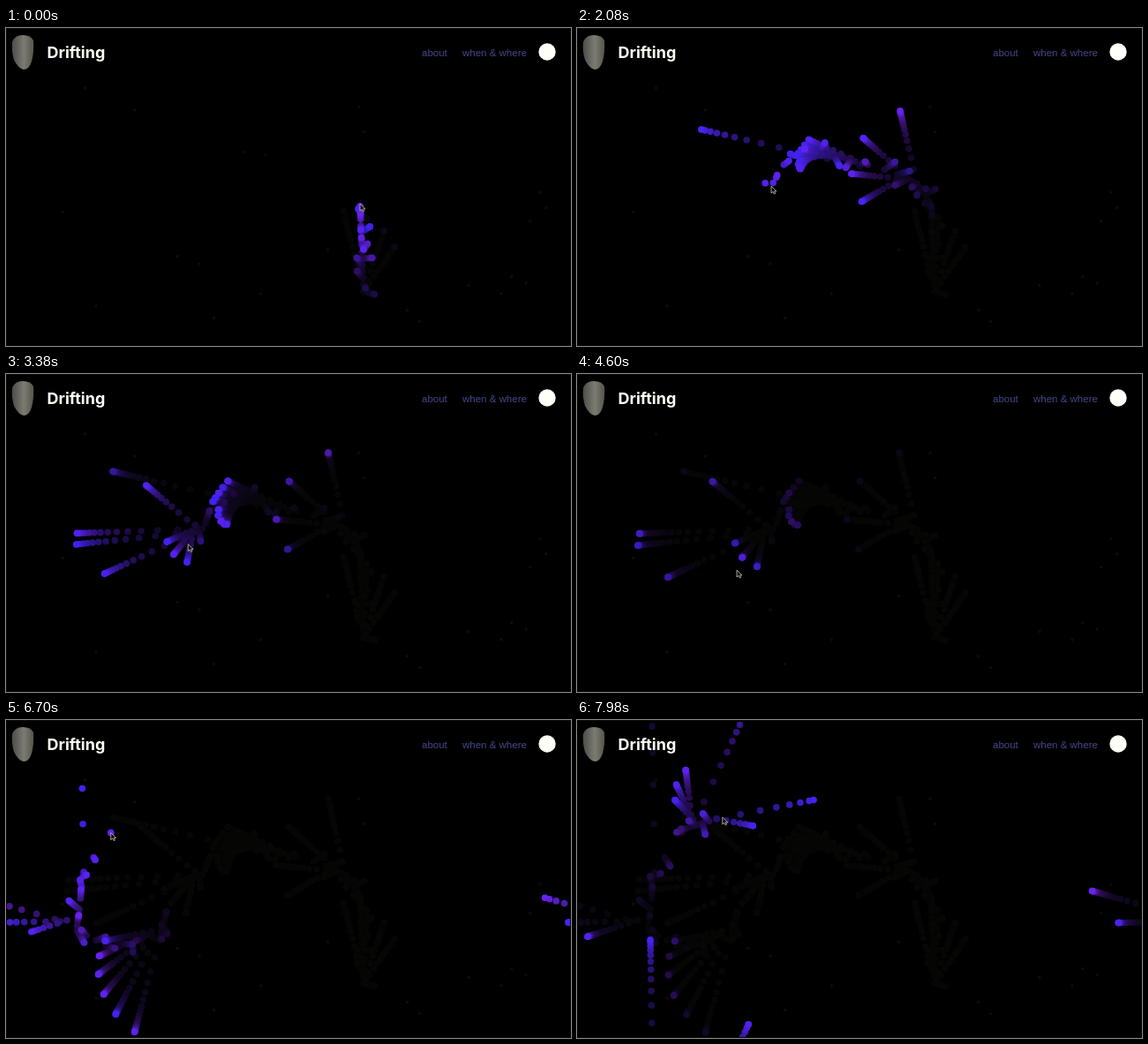
An HTML page with a canvas for the animation above (8000 ms loop, 640x360 px).

```html
<!DOCTYPE html>
<html lang="en">
<head>
<meta charset="utf-8">
<title>Drifting</title>
<style>
  html, body { margin: 0; width: 100%; height: 100%; overflow: hidden; background: #000; }
  canvas, svg { position: absolute; left: 0; top: 0; width: 640px; height: 360px; }
  .brand { font: 700 18px Inter, sans-serif; fill: #fffff4; }
  .nav { font: 11.5px "Liberation Sans", Arial, sans-serif; fill: #46468c; }
</style>
</head>
<body>
<canvas id="stage" width="640" height="360"></canvas>
<svg viewBox="0 0 640 360">
  <defs>
    <linearGradient id="skin">
      <stop offset="0" stop-color="#4c4c49"/>
      <stop offset=".55" stop-color="#7c7b72"/>
      <stop offset="1" stop-color="#56554a"/>
    </linearGradient>
  </defs>
  <rect x=".5" y=".5" width="639" height="359" fill="none" stroke="#0f0f08"/>
  <path d="M7 16Q10 8 19 8Q28 8 31 14Q32 27 29 38Q26 47 20 47Q14 46 9 36Q6 26 7 16Z" fill="url(#skin)"/>
  <text class="brand" x="46.5" y="34">Drifting</text>
  <text class="nav" x="471" y="32">about</text>
  <text class="nav" x="517" y="32">when &amp; where</text>
  <circle cx="613" cy="27" r="9.7" fill="#fffff8"/>
  <path id="cursor" d="M0 0V8L2 6.3L3.4 9L4.7 8.3L3.5 5.8H6Z" fill="#0c0c08" stroke="#b4b4a0" stroke-width=".9"/>
</svg>
<script>
const W = 640, H = 360, LOOP = 8000, STEP = 40;
const DRAG = 0.002, SPACING = 100, STAGGER = 50, RADIUS = 3.8;
const ctx = document.getElementById('stage').getContext('2d');
const cursor = document.getElementById('cursor');

// Pointer route: time, x, y
const path = [
  [-1600, 405, 298], [0, 401, 199], [700, 385, 176], [1000, 355, 162],
  [1500, 275, 140], [1800, 240, 145], [2080, 220, 179], [2300, 214, 171],
  [3380, 206, 193], [4600, 181, 222], [5000, 176, 238], [5440, 116, 257],
  [5850, 80, 238], [6490, 88, 172], [6700, 122, 123], [7300, 158, 112],
  [7980, 165, 110]
];

// Fans of rays: start time, count, first and last angle, first and last reach
const fans = [
  [-4000, 4, -104, -55, 95, 62],
  [700, 4, -103, -210, 90, 60],
  [900, 1, -167, -167, 254, 254],
  [1200, 5, -156, -180, 80, 58],
  [1450, 5, 165, 105, 45, 30],
  [2050, 2, 178, 174, 153, 153],
  [2150, 2, 155, 220, 129, 84],
  [2200, 3, 156, 102, 42, 49],
  [4710, 6, 105, 168, 134, 68],
  [5900, 3, 196, 162, 145, 75],
  [6490, 1, -91, -91, 299, 299],
  [6850, 1, -65, -65, 168, 168],
  [6850, 3, -97, -133, 72, 44],
  [7300, 2, -11, 11, 153, 59]
];

// Dot colour by age in ms
const fade = [
  [0, 62, 34, 238], [300, 46, 24, 165], [700, 30, 13, 88],
  [1200, 17, 7, 36], [2000, 6, 6, 5]
];

const lerp = (a, b, p) => a + (b - a) * p;

const noise = n => {
  const s = Math.sin(n * 12.9898) * 43758.5453;
  return s - Math.floor(s);
};

function sample(table, t) {
  const next = table.findIndex(row => row[0] > t);
  if (next === 0) return table[0].slice(1);
  if (next < 0) return table[table.length - 1].slice(1);
  const a = table[next - 1], b = table[next];
  const p = (t - a[0]) / (b[0] - a[0]);
  return a.slice(1).map((v, k) => lerp(v, b[k + 1], p));
}

function launch(birth, degrees, reach, life) {
  const [x, y] = sample(path, birth);
  const angle = degrees * Math.PI / 180;
  return {
    birth, x, y, life,
    dx: Math.cos(angle) * reach,
    dy: Math.sin(angle) * reach,
    violet: noise(birth + degrees)
  };
}

function makeFan([start, count, angle0, angle1, reach0, reach1]) {
  return Array.from({ length: count }, (_, i) => {
    const p = count > 1 ? i / (count - 1) : 0;
    const life = 2000 + 400 * noise(start + i);
    return launch(start + i * STAGGER, lerp(angle0, angle1, p), lerp(reach0, reach1, p), life);
  });
}

// Short sparks appear while the pointer moves quickly.
function makeSparks() {
  const sparks = [];
  for (let t = -1600; t < 7300; t += 120) {
    const [x0, y0] = sample(path, t);
    const [x1, y1] = sample(path, t + 100);
    if (Math.hypot(x1 - x0, y1 - y0) < 4) continue;
    sparks.push(launch(t, 360 * noise(t + 1), 6 + 16 * noise(t + 2), 700));
  }
  return sparks;
}

const particles = [...fans.flatMap(makeFan), ...makeSparks()];

function position(p, age) {
  const travelled = 1 - Math.exp(-DRAG * age);
  return [p.x + p.dx * travelled, p.y + p.dy * travelled];
}

function collectDots(t) {
  const dots = [];
  for (const p of particles) {
    const age = t - p.birth;
    if (age < 0) continue;
    const add = at => dots.push({ pos: position(p, at), age: age - at, violet: p.violet });
    const end = Math.min(age, p.life);
    for (let at = 0; at < end; at += SPACING) add(at);
    add(end);
  }
  return dots.sort((a, b) => b.age - a.age);
}

function drawDot({ pos: [x, y], age, violet }) {
  const [r, g, b] = sample(fade, age);
  const warmth = 45 * violet * Math.max(0, 1 - age / 1200);
  ctx.fillStyle = `rgb(${r + warmth},${g},${b})`;
  ctx.beginPath();
  ctx.arc((x + W) % W, (y + H) % H, RADIUS, 0, Math.PI * 2);
  ctx.fill();
}

function drawSpecks() {
  ctx.fillStyle = '#0d0d0d';
  for (let i = 0; i < 22; i++) ctx.fillRect(noise(i + 300) * W, 60 + noise(i + 700) * 280, 3, 3);
}

let start;
function render(now) {
  start ??= now;
  const t = Math.floor(((now - start) % LOOP) / STEP) * STEP;
  ctx.fillStyle = '#000';
  ctx.fillRect(0, 0, W, H);
  drawSpecks();
  collectDots(t).forEach(drawDot);
  const [x, y] = sample(path, t);
  cursor.setAttribute('transform', `translate(${x} ${y})`);
  requestAnimationFrame(render);
}
requestAnimationFrame(render);
</script>
</body>
</html>
```
